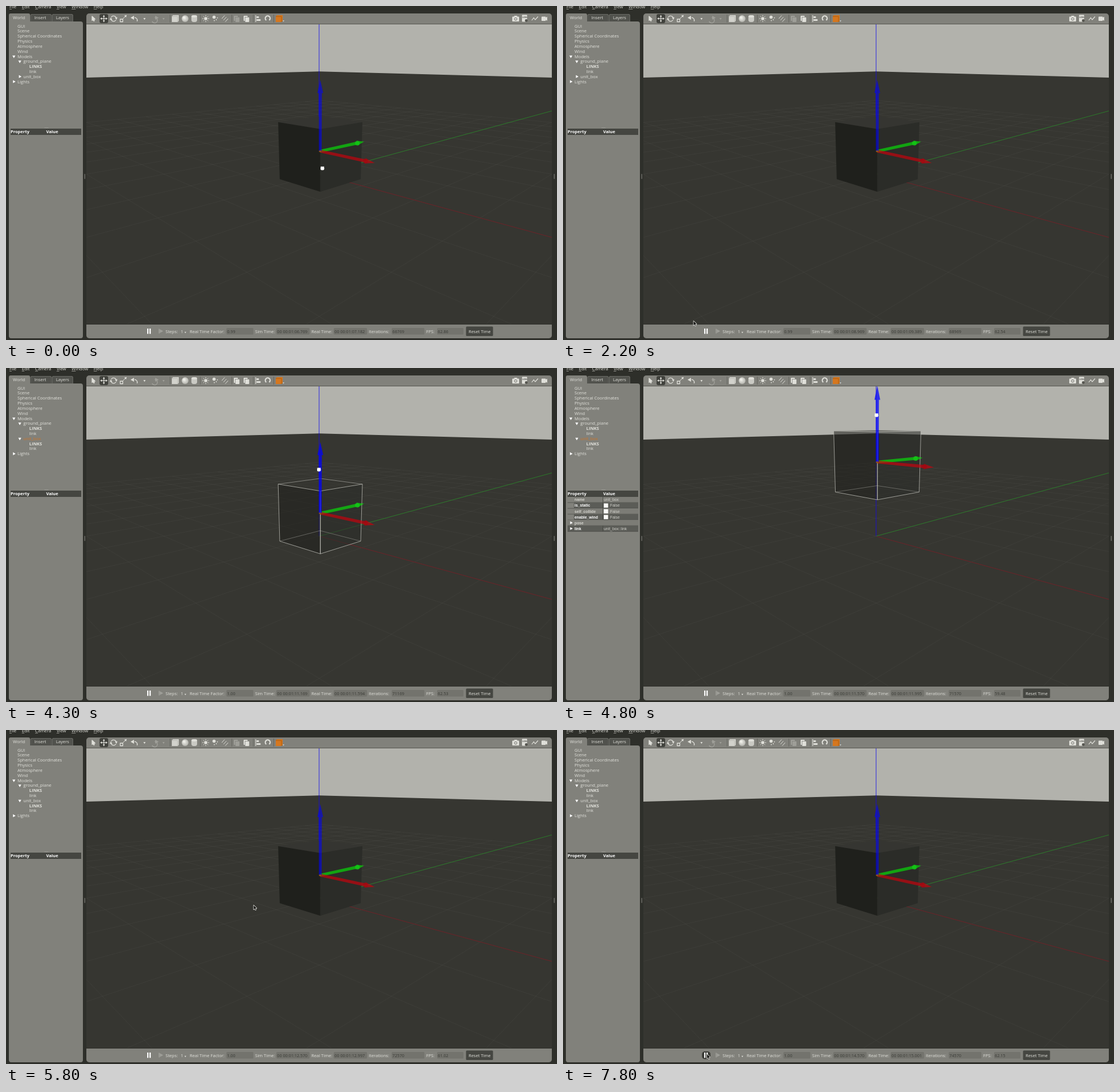
An HTML page with a canvas for the animation above (8000 ms loop, 960 px wide and 583 px high).

```html
<!DOCTYPE html>
<html lang="en">
<head>
<meta charset="utf-8">
<title>Simulator: drop the box</title>
<style>
html, body { margin: 0; width: 100%; height: 100%; overflow: hidden; background: #2e2f2a; }
canvas { display: block; width: 960px; height: 583px; }
</style>
</head>
<body>
<canvas id="stage"></canvas>
<script>
const canvas = document.getElementById('stage');
const dpr = window.devicePixelRatio || 1;
canvas.width = 960 * dpr;
canvas.height = 583 * dpr;
const g = canvas.getContext('2d');

const LOOP = 8000, TAU = Math.PI * 2;
const VIEW = { x: 140, y: 32, w: 811, h: 523 };
const PANEL = '#81817b', DARK = '#2e2f2a', TAB = '#51524d', SLOT = '#454641';
const LIGHT = '#e2e2dc', ICON = '#dfdfd9', MUTED = '#9f9f99';
const UI = '"Open Sans", "Noto Sans", sans-serif';
const ARIAL = '"Liberation Sans", Arial, sans-serif';

// ---------- drawing helpers ----------
function rect(x, y, w, h, fill) { g.fillStyle = fill; g.fillRect(x, y, w, h); }

function round(x, y, w, h, r, fill) {
  g.beginPath();
  g.roundRect(x, y, w, h, r);
  g.fillStyle = fill;
  g.fill();
}

function text(s, x, y, { size = 7.6, color = LIGHT, bold = false, font = UI } = {}) {
  g.font = (bold ? 'bold ' : '') + size + 'px ' + font;
  g.fillStyle = color;
  g.fillText(s, x, y);
  return g.measureText(s).width;
}

function trace(pts, close) {
  g.beginPath();
  pts.forEach(([x, y]) => g.lineTo(x, y));
  if (close) g.closePath();
}

function poly(pts, fill) { trace(pts, true); g.fillStyle = fill; g.fill(); }

function stroke(color, width) { g.strokeStyle = color; g.lineWidth = width; g.stroke(); }

function line(pts, color, width = 1) { trace(pts); stroke(color, width); }

function oval(x, y, rx, ry, fill) {
  g.beginPath();
  g.ellipse(x, y, rx, ry, 0, 0, TAU);
  g.fillStyle = fill;
  g.fill();
}
const disc = (x, y, r, fill) => oval(x, y, r, r, fill);

function arc(x, y, r, from, to, color, width = 1.3) {
  g.beginPath();
  g.arc(x, y, r, from, to);
  stroke(color, width);
}

// Triangle pointing along angle a.
function tri(x, y, a, r = 3, fill = '#fff') {
  poly([0, 1, 2].map(i => [x + r * Math.cos(a + i * TAU / 3), y + r * Math.sin(a + i * TAU / 3)]), fill);
}
const RIGHT = 0, DOWN = TAU / 4;

const around = (n, draw) => { for (let i = 0; i < n; i++) draw(i * TAU / n); };
const polar = (x, y, r, a) => [x + r * Math.cos(a), y + r * Math.sin(a)];

// ---------- camera: stands at (5, -5, 2), looks at the world centre ----------
const DIST = Math.hypot(5, 5), RANGE = Math.hypot(DIST, 2);
const COS = DIST / RANGE, SIN = 2 / RANGE;
const FOCAL = VIEW.w / 2 / Math.tan(Math.PI / 6);
const MID = [VIEW.x + VIEW.w / 2, VIEW.y + VIEW.h / 2];

function toCamera([x, y, z]) {
  const side = (x + y) * Math.SQRT1_2, ahead = DIST + (y - x) * Math.SQRT1_2, up = z - 2;
  return [side, up * COS + ahead * SIN, ahead * COS - up * SIN];
}
const toScreen = ([s, u, d]) => [MID[0] + FOCAL * s / d, MID[1] - FOCAL * u / d];
const project = p => toScreen(toCamera(p));
const mix = (a, b, k) => a + (b - a) * k;

function line3(a, b, color, width) {
  const near = 0.1;
  let [p, q] = [toCamera(a), toCamera(b)].sort((m, n) => n[2] - m[2]);
  if (p[2] < near) return;
  if (q[2] < near) q = p.map((v, i) => mix(v, q[i], (p[2] - near) / (p[2] - q[2])));
  line([toScreen(p), toScreen(q)], color, width);
}

// ---------- motion ----------
const HOVER = 4000, PICK = 4200, GRAB = 4300, TOP = 4800, DROP = 4893, CLEAR = 5000, LIFT = 0.866;
const smooth = k => k * k * (3 - 2 * k);
const clamp = k => Math.min(1, Math.max(0, k));

// Time, x and y of the places where the pointer turns or rests.
const PATH = [
  [100, 551, 283], [900, 500, 210], [1750, 147, 455], [2200, 227.5, 550], [2450, 239, 573], [3400, 518, 177],
  [GRAB, 545, 177], [TOP, 546, 82], [5200, 544, 101], [5800, 431.5, 306], [6150, 470, 162], [7000, 220, 570], [7800, 251, 566]
];

function pointerAt(t) {
  const i = PATH.findIndex(p => p[0] > t);
  if (i < 1) return PATH.at(i).slice(1);
  const [t0, x0, y0] = PATH[i - 1], [t1, x1, y1] = PATH[i];
  const k = smooth((t - t0) / (t1 - t0));
  return [mix(x0, x1, k), mix(y0, y1, k)];
}

function heightAt(t) {
  if (t < DROP) return LIFT * smooth(clamp((t - GRAB) / (TOP - GRAB)));
  return Math.max(0, LIFT - 9.81 / 2 * ((t - DROP) / 1000) ** 2);
}

const RATES = ['62.86', '62.48', '62.54', '62.61', '62.53', '59.48', '61.02', '61.87', '62.15'];

function countersAt(t) {
  const n = Math.floor((t + 100) / 200);
  return {
    sim: 66769 + 200 * n + Math.floor(n / 24),
    real: 67182 + Math.round(200.5 * n - 0.1 + 1.5 * Math.sin(Math.PI * n / 39)),
    factor: t < 3000 ? '0.99' : '1.00',
    fps: RATES[Math.floor((t + 600) / 1000)]
  };
}
const clock = ms => '00 00:01:' + (ms / 1000 - 60).toFixed(3).padStart(6, '0');

// ---------- scene ----------
const BX = 0.24, BY = -0.212;
const face = z => [-1, 1, 3, 5].map(i => {
  const [x, y] = polar(BX, BY, Math.SQRT1_2, i * TAU / 8);
  return project([x, y, z]);
});

function drawWorld() {
  rect(VIEW.x, VIEW.y, VIEW.w, VIEW.h, '#b2b2ac');
  const left = project([-50, -50, 0]), right = project([50, 50, 0]);
  poly([project([-50, 50, 0]), right, [right[0], 583], [left[0], 583], left], '#363631');
  for (let i = -10; i <= 10; i++) {
    line3([i, -10, 0], [i, 10, 0], 'rgba(255,255,255,.034)');
    line3([-10, i, 0], [10, i, 0], 'rgba(255,255,255,.034)');
  }
  line3([0, 0, 0], [50, 0, 0], '#6c2026');
  line3([0, 0, 0], [0, 50, 0], '#2b7a2a');
  const [x, y] = project([0, 0, 0]);
  line([[x, y], [x, 114]], '#241c9c', 1.5);
  line([[x, 114], [x, VIEW.y]], '#4340d8', 1.2);
}

function drawBox(z, selected) {
  const [n, r, b, l] = face(z), [N, R, B, L] = face(z + 1);
  g.globalAlpha = selected ? 0.55 : 1;
  poly([N, R, B, L], '#353531');
  poly([l, n, N, L], '#1f201c');
  poly([n, r, R, N], '#2b2c28');
  g.globalAlpha = 1;
  if (!selected) return;
  line([l, b, r], '#80807a', 0.7);
  line([L, B, R], '#a5a59f', 0.7);
  line([L, N, R, r, n, l, L], '#c0c0ba', 0.75);
  line([N, n], '#d6d6d0', 1);
}

function arrow(from, neck, tip, color, wide) {
  const a = Math.atan2(tip[1] - from[1], tip[0] - from[0]) + TAU / 4;
  const off = (p, d) => polar(p[0], p[1], d, a);
  poly([off(from, 2.4), off(neck, 2.7), off(neck, wide), tip, off(neck, -wide), off(neck, -2.7), off(from, -2.4)], color);
}

function drawGizmo(z, hot) {
  const c = [BX, BY, z + 0.5], from = project(c);
  const along = (axis, d) => project(c.map((v, k) => k === axis ? v + d : v));
  const axisArrow = (axis, tip, color, wide, knob) => {
    const neck = along(axis, 0.98);
    arrow(from, neck, along(axis, tip), color, wide);
    if (knob) disc(neck[0] + 0.5, neck[1], wide - 0.2, knob);
  };
  axisArrow(1, 1.19, 'rgba(0,255,0,.57)', 4.2, 'rgba(20,215,25,.6)');
  axisArrow(0, 1.165, 'rgba(205,0,12,.66)', 4.5, 'rgba(170,0,12,.5)');
  axisArrow(2, 1.19, hot ? 'rgba(0,0,255,.74)' : 'rgba(0,0,255,.57)', 5);
  rect(from[0] - 2, from[1] - 1, 3, 2.5, '#9a5a10');
}

// ---------- interface ----------
function drawMenu() {
  let x = 6;
  for (const s of ['File', 'Edit', 'Camera', 'View', 'Window', 'Help']) {
    const w = text(s, x, 3.8, { size: 7.7, color: '#dcdcd6' });
    rect(x, 5, g.measureText(s[0]).width, 0.7, '#bdbdb7');
    x += w + 9.5;
  }
}

function drawTree(open, selected) {
  round(5, 27, 129, 553, [0, 4, 4, 4], PANEL);
  ['World', 'Insert', 'Layers'].forEach((s, i) => {
    const x = 5 + i * 37.5;
    round(x, i ? 14 : 13, 37, i ? 13 : 15, [3, 3, 0, 0], i ? '#6f706a' : PANEL);
    if (i) round(x + 0.8, 14.8, 35.4, 12.2, [3, 3, 0, 0], TAB);
    text(s, x + 7, 23);
  });
  const rows = ['GUI', 'Scene', 'Spherical Coordinates', 'Physics', 'Atmosphere', 'Wind', 'Models', '-ground_plane', '--LINKS', '--link', '-unit_box'];
  if (open) rows.push('--LINKS', '--link');
  rows.push('Lights');
  rows.forEach((row, i) => {
    const s = row.replace(/-/g, ''), x = 20 + (row.length - s.length) * 10.3, y = 35 + i * 8.82;
    text(s, x, y + 2.6, { bold: s === 'LINKS', color: selected && s === 'unit_box' ? '#cd7428' : LIGHT });
    if (s === 'Models' || s === 'ground_plane' || s === 'unit_box' || s === 'Lights') {
      const shut = s === 'Lights' || (s === 'unit_box' && !open);
      tri(x - 6.3, y, shut ? RIGHT : DOWN);
    }
  });
}

function drawProperties(full) {
  rect(67, 212, 7, 0.8, '#999993');
  rect(8, 214, 123, 11, SLOT);
  text('Property', 8, 222.3, { size: 7.5, bold: true, color: '#fff' });
  text('Value', 70, 222.3, { size: 7.5, bold: true, color: '#fff' });
  if (!full) return;
  const rows = { name: 'unit_box', is_static: 'False', self_collide: 'False', enable_wind: 'False', pose: '', link: 'unit_box::link' };
  Object.entries(rows).forEach(([key, value], i) => {
    const y = 225 + i * 10.05, dim = i % 2 === 0, group = i > 3, check = value === 'False';
    const x = group ? 8 : 19;
    rect(x, y, 131 - x, 10, dim ? '#7c7c76' : '#5b5c57');
    rect(8, y + 9.6, 123, 0.7, SLOT);
    if (value) rect(69, y, 0.8, 10, SLOT);
    text(key, 20, y + 7.4, { size: 6.8, bold: true, font: ARIAL, color: dim ? '#d4d4ce' : '#fff' });
    if (check) rect(71, y + 1.3, 7.6, 7.4, '#fbfbf8');
    text(value, check ? 82 : 71, y + 7.4, { size: 6.9, font: ARIAL, color: '#d0d0ca' });
    if (group) tri(14, y + 5, RIGHT);
  });
}

function sheets(x, color) {
  round(x - 5, 17, 7, 9, 1, color);
  round(x - 3, 19, 8, 9, 1, PANEL);
  round(x - 2.3, 19.7, 7, 8.3, 1, color);
}

function cube(x, y, r, front, top) {
  poly([[x - r, y - r + 2], [x - r + 2, y - r], [x + r, y - r], [x + r, y + r - 2], [x + r - 2, y + r], [x - r, y + r]], front);
  line([[x - r, y - r + 2.3], [x + r - 2, y - r + 2.3], [x + r - 2, y + r]], top, 0.8);
}

function bend(x, dir, color) {
  tri(x - 4 * dir, 20.5, dir > 0 ? Math.PI : 0, 4, color);
  arc(x - dir, 25, 4.7, -TAU / 4, dir > 0 ? 0.4 : Math.PI - 0.4, color, 1.5);
}

function pointer(x, y, fill, edge, size = 1) {
  const at = (r, a) => polar(x, y, r * size, a);
  trace([at(0, 0), at(7.2, 1.57), at(5.9, 1.28), at(8.7, 1.23), at(8.7, 1.1), at(5.9, 1.05), at(7.2, 0.77)], true);
  g.lineJoin = 'round';
  stroke(edge, 1.4);
  g.fillStyle = fill;
  g.fill();
}

function drawToolbar(selected) {
  const y = 22;
  round(140, 13, 811, 18.5, [5, 5, 0, 0], PANEL);
  pointer(150, 18, ICON, ICON);

  round(163, 14, 15, 16, 3, '#41423d');
  around(4, a => {
    line([[170.5, y], polar(170.5, y, 4, a)], ICON, 1.2);
    tri(...polar(170.5, y, 4.4, a), a, 2.2, ICON);
  });
  around(2, a => {
    arc(187.5, y, 4.7, a + 0.5, a + 2.8, ICON);
    tri(...polar(187.5, y, 4.7, a + 3), a + 3 + DOWN, 2.6, ICON);
  });
  g.strokeStyle = ICON;
  g.strokeRect(199, 23, 4.5, 4.5);
  line([[203, 23], [209, 17]], ICON);
  tri(208.5, 17.5, -TAU / 8, 2.6, ICON);

  bend(225, 1, ICON);
  tri(241.3, y, DOWN, 2.2, ICON);
  bend(258, -1, MUTED);
  tri(274.5, y, DOWN, 2.2, MUTED);
  for (const x of [285.5, 338, 393, 430.5, 466]) rect(x, 15, 0.8, 14, '#5f605a');

  cube(295, y, 6, '#d2d2cc', '#b4b4ae');
  const ball = g.createRadialGradient(310, 20, 1, 312, y, 6);
  ball.addColorStop(0, '#f0f0ea');
  ball.addColorStop(1, '#b4b4ae');
  disc(312, y, 6, ball);
  round(323, 16, 10, 12, 4, '#cacac4');
  oval(328, 18, 5, 2, ICON);

  disc(348, y, 2.8, ICON);
  around(8, a => line([polar(348, y, 4, a), polar(348, y, 6, a)], ICON));
  disc(362.5, 19.5, 2.8, ICON);
  for (let i = 0; i < 3; i++) disc(...polar(362.5, 19.5, 6, 0.2 + i * 0.65), 0.9, ICON);
  for (let i = 0; i < 3; i++) line([[376 + i * 3, y + i * 2.8], [381 + i * 3, 16.5 + i * 2.8]], ICON);

  sheets(402, selected ? ICON : MUTED);
  sheets(419, ICON);
  rect(434.5, 16, 1.2, 12, ICON);
  for (let i = 0; i < 2; i++) rect(436.5, 18 + i * 5, 4 + i * 3, 3, ICON);
  arc(456, y - 0.5, 4.2, 2.2, 7.2, ICON, 2.2);
  cube(476, y, 6, '#d5771f', '#a4590f');
  tri(483.5, 26, DOWN, 1.5, ICON);

  round(882, 18.5, 12, 8.5, 1, ICON);
  rect(885.5, 17, 5, 2, ICON);
  arc(888, 22.7, 2.2, 0, TAU, '#6e6e69', 1);
  round(899, 15.5, 9, 12, 1, ICON);
  text('LOG', 899.6, 21, { size: 4, bold: true, color: '#4a4a46' });
  disc(906.5, 25.5, 2.4, '#55554f');
  line([[916, 25], [919.5, 20.5], [922, 24], [927, 18.5]], ICON, 1.2);
  round(933, 18.5, 7.5, 7.5, 1, ICON);
  tri(941, y + 0.3, Math.PI, 4, ICON);
}

function drawStatus(t, hover) {
  const c = countersAt(t), y = 570.5;
  round(140, 556, 811, 24, [0, 0, 5, 5], PANEL);
  if (hover) round(242, 561, 15, 13.5, 5, '#3c3d38');
  for (const x of [246, 250]) rect(x, 563, 2.2, 9.3, '#fff');
  rect(266, 563.5, 1.6, 8, MUTED);
  tri(270, 567.5, RIGHT, 3.8, MUTED);
  text('Steps:', 278, y);
  text('1', 304.5, y);
  tri(312.5, 569.5, DOWN, 1.7, LIGHT);
  const fields = [['Real Time Factor:', 320, 384, 47, c.factor], ['Sim Time:', 434, 471, 58, clock(c.sim)],
    ['Real Time:', 532, 571, 58, clock(c.real)], ['Iterations:', 632, 672, 57, c.sim], ['FPS:', 732, 751, 46, c.fps]];
  for (const [label, x, box, w, value] of fields) {
    text(label, x, y);
    round(box, 562, w, 11.5, 1.5, '#73736d');
    text(value, box + 1.3, y, { size: 7.2, color: '#393a35' });
  }
  round(801.5, 559.5, 47, 16.5, 1.5, SLOT);
  text('Reset Time', 806, y, { size: 7.5 });
}

function drawHand(x, y) {
  round(x - 3, y - 1.8, 6.4, 5.2, 2, '#fff');
  for (let i = 0; i < 4; i++) round(x - 2.7 + i * 1.5, y - 3, 1.4, 4, 0.7, '#fff');
}

function draw(time) {
  const t = Math.floor(time / 100) * 100;
  const [x, y] = pointerAt(t), z = heightAt(t);
  const selected = t >= PICK && t < CLEAR, hot = t >= HOVER && t < CLEAR;
  const side = Math.abs(x - 548);
  const overBox = side < 73 && y > 193 + side * 0.14 && y < 324 - side * 0.3;

  g.setTransform(dpr, 0, 0, dpr, 0, 0);
  rect(0, 0, 960, 583, DARK);
  drawMenu();
  drawTree(t >= PICK, selected);
  drawProperties(t > GRAB && t < CLEAR);
  drawToolbar(selected);
  g.save();
  g.beginPath();
  g.rect(VIEW.x, VIEW.y, VIEW.w, VIEW.h);
  g.clip();
  drawWorld();
  drawBox(z, selected);
  drawGizmo(z, hot);
  g.restore();
  drawStatus(t, x > 242 && x < 257 && y > 560);
  for (const bar of [136.5, 954.5]) round(bar, 293, 1.6, 9, 0.8, '#6a6a65');
  if (hot || overBox) drawHand(x, y); else pointer(x, y, '#151512', '#f2f2ee');
}

const start = performance.now();
function tick(now) {
  draw(Math.max(0, now - start) % LOOP);
  requestAnimationFrame(tick);
}
draw(0);
requestAnimationFrame(tick);
</script>
</body>
</html>
```
